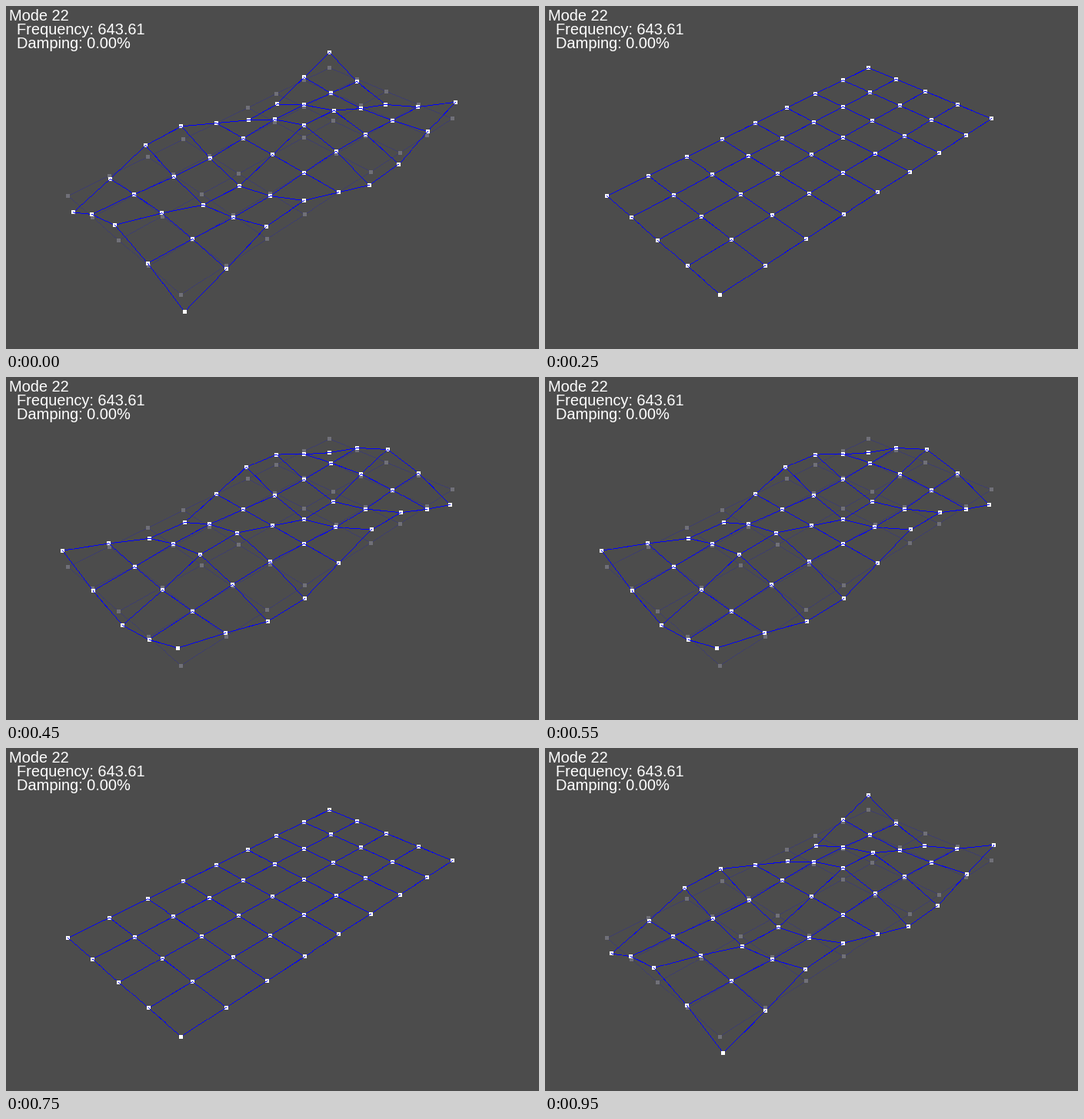
A matplotlib script that plays this animation: 693 by 447 pixels, repeating every 1000 ms.

```python
import numpy as np
import matplotlib.pyplot as plt
from matplotlib.animation import FuncAnimation

WIDTH, HEIGHT, DPI = 693, 447, 64
FRAMES, INTERVAL = 20, 50
PX = 72 / DPI  # points per pixel
NX, NY = 9, 5

BACKGROUND = (76, 76, 76)
BLUE, WHITE = (0, 0, 255), (255, 255, 255)
GHOST_LINE, GHOST_NODE = (61, 61, 112), (112, 112, 120)

# Screen corners of the undeformed plate and the vanishing point of "down".
LEFT, BOTTOM, RIGHT, TOP = np.array(
    [(80, 247), (227.3, 375.5), (580.2, 146.3), (420, 80.1)])
DOWN = np.array([400, 1280, 1])
AMPLITUDE = 0.0212

# Quarter of the mode shape: symmetric across, antisymmetric along the plate.
QUARTER = np.array([
    [1.00, 0.20, -0.69, -0.795],
    [-0.16, -0.04, 0.12, 0.16],
    [-0.86, -0.18, 0.64, 0.735],
])
half = np.vstack([QUARTER, QUARTER[1::-1]])
MODE = np.hstack([half, np.zeros((NY, 1)), -half[:, ::-1]])


def plate_plane():
    """Homogeneous screen coordinates of the flat plate's nodes."""
    sides = np.column_stack([TOP - RIGHT, BOTTOM - RIGHT])
    w_top, w_bottom = np.linalg.solve(sides, LEFT - RIGHT)
    origin = np.append(LEFT, 1)
    along = w_top * np.append(TOP, 1) - origin
    across = w_bottom * np.append(BOTTOM, 1) - origin
    u = np.linspace(0, 1, NX)[None, :, None]
    v = np.linspace(0, 1, NY)[:, None, None]
    return origin + u * along + v * across


PLANE = plate_plane()


def nodes(phase):
    q = PLANE + AMPLITUDE * phase * MODE[..., None] * DOWN
    return q[..., :2] / q[..., 2:]


def edges(p):
    """Segments running from the far node to the near node of each edge."""
    along = np.stack([p[:, 1:], p[:, :-1]], axis=2).reshape(-1, 2, 2)
    across = np.stack([p[:-1], p[1:]], axis=2).reshape(-1, 2, 2)
    return np.concatenate([along, across])


def draw_lines(canvas, segments, color):
    """Hard-edged lines, one pixel wide."""
    for start, end in segments:
        steps = int(np.abs(end - start).max().round()) + 1
        x, y = np.rint(np.linspace(start, end, steps)).astype(int).T
        canvas[y, x] = color


def draw_nodes(canvas, p, color):
    for x, y in np.rint(p.reshape(-1, 2)).astype(int):
        canvas[y - 2:y + 3, x - 2:x + 3] = color


def draw_plate(canvas, p, line_color, node_color):
    """Edges leaving a node towards the viewer pass in front of its marker."""
    segments = edges(p)
    far_halves = np.stack([segments[:, 0], segments.mean(axis=1)], axis=1)
    draw_lines(canvas, segments, line_color)
    draw_nodes(canvas, p, node_color)
    draw_lines(canvas, far_halves, line_color)


backdrop = np.full((HEIGHT, WIDTH, 3), BACKGROUND, dtype=np.uint8)
draw_lines(backdrop, edges(nodes(0)), GHOST_LINE)
draw_nodes(backdrop, nodes(0), GHOST_NODE)

fig = plt.figure(figsize=(WIDTH / DPI, HEIGHT / DPI), dpi=DPI,
                 facecolor="#4c4c4c")
ax = fig.add_axes([0, 0, 1, 1])
ax.axis("off")
picture = ax.imshow(backdrop, extent=(0, WIDTH, HEIGHT, 0), aspect="auto",
                    interpolation="nearest")

for x, y, label in [(4, 19, "Mode 22"),
                    (14, 37, "Frequency: 643.61"),
                    (14, 55, "Damping: 0.00%")]:
    ax.text(x, y, label, color="white", family="Liberation Sans",
            size=20 * PX, va="baseline")


def update(frame):
    canvas = backdrop.copy()
    phase = np.cos(2 * np.pi * frame / FRAMES)
    draw_plate(canvas, nodes(phase), BLUE, WHITE)
    picture.set_data(canvas)
    return [picture]


anim = FuncAnimation(fig, update, frames=FRAMES, interval=INTERVAL,
                     repeat=True, repeat_delay=0)
plt.show()
```
